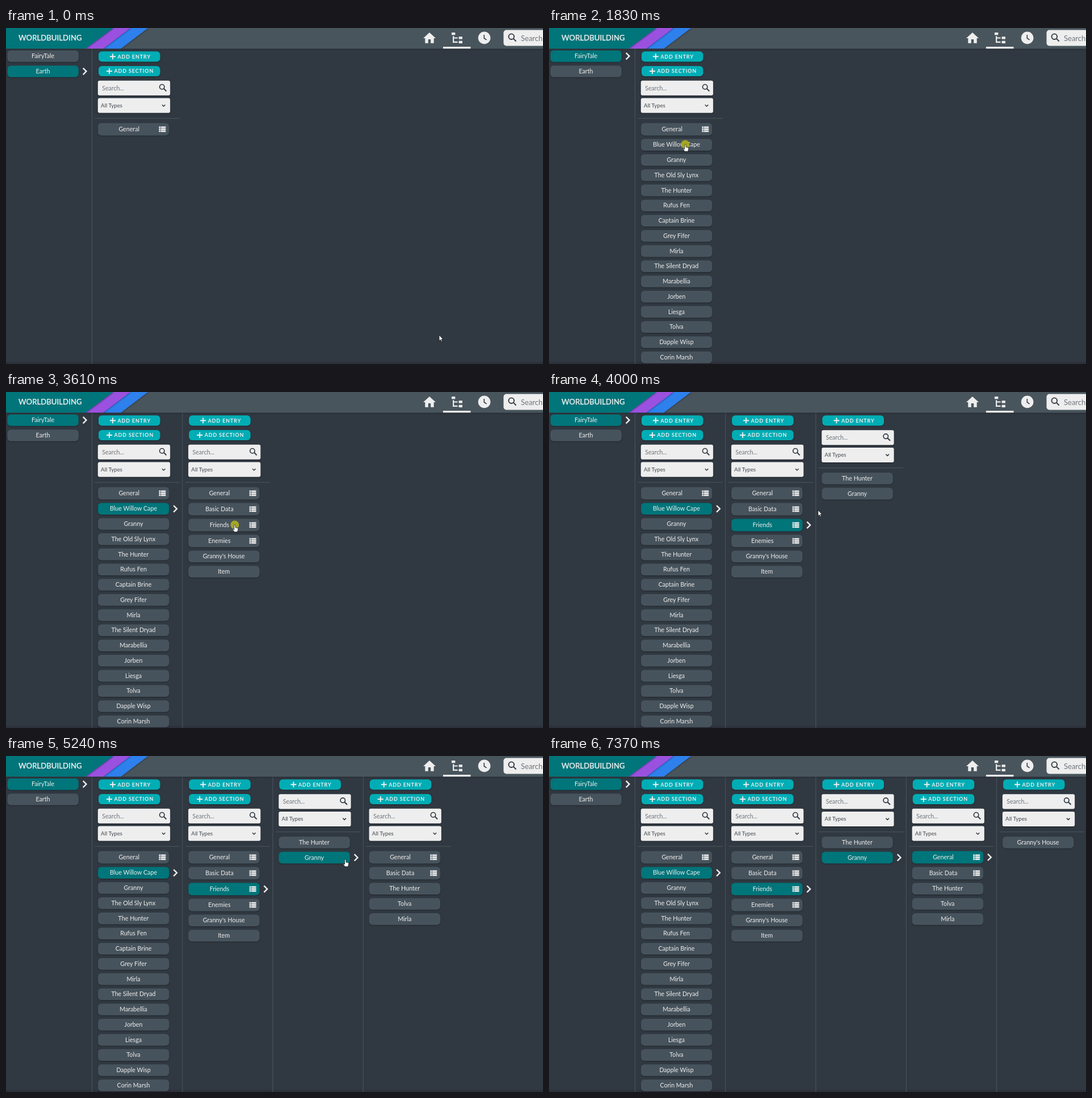
These frames come from a looping animation (946 px wide and 592 px high, 7.76 s). An HTML page:

```html
<!DOCTYPE html>
<html lang="en">
<head>
<meta charset="utf-8">
<title>Worldbuilding columns</title>
<style>
html, body { margin: 0; width: 100%; height: 100%; overflow: hidden; background: #303841; }
svg { display: block; width: 946px; height: 592px; font-family: Lato, "Open Sans", sans-serif; }
.row rect { fill: #46535c; }
.row.on rect { fill: #06747a; }
.row text { font-size: 10.7px; fill: #eee; text-anchor: middle; }
.add rect { fill: #00adb5; }
.add text { font-size: 9px; font-weight: 700; letter-spacing: .85px; fill: #eee; }
.chev, .plus { fill: none; stroke: #eee; }
.field { fill: #eee; }
.hint { font-size: 10.6px; fill: #70757a; }
.pick { font-size: 9.7px; fill: #42484e; }
.ink { fill: none; stroke: #303841; }
</style>
</head>
<body>
<svg id="stage" viewBox="0 0 946 592">
  <defs>
    <filter id="soft" x="-10%" y="-10%" width="120%" height="130%">
      <feDropShadow dx="0" dy="1" stdDeviation="1" flood-color="#000" flood-opacity=".35"/>
    </filter>
    <filter id="edge" x="-10%" y="-20%" width="130%" height="140%">
      <feDropShadow dx="1" dy="0" stdDeviation="1.6" flood-color="#000" flood-opacity=".5"/>
    </filter>
    <clipPath id="bar"><rect width="946" height="36.5"/></clipPath>
  </defs>
  <rect width="946" height="592" fill="#303841"/>
  <rect y="588.5" width="946" height="3.5" fill="#2c303a"/>
  <g id="columns"></g>
  <rect id="scroll" x="299.5" y="164.5" width="4.6" height="274" rx="2.3" fill="#495059"/>
  <g filter="url(#soft)"><rect width="946" height="36.5" fill="#48555d"/></g>
  <g clip-path="url(#bar)">
    <path d="M219 0H250L202 36.5H171z" fill="#2f80ed" filter="url(#edge)"/>
    <path d="M187 0H219L171 36.5H139z" fill="#9b51e0" filter="url(#edge)"/>
    <path d="M0 0H189L140 36.5H0z" fill="#06747a" filter="url(#edge)"/>
  </g>
  <text x="22" y="21.8" font-size="13.2" font-weight="500" fill="#eee" stroke="#eee" stroke-width=".25">WORLDBUILDING</text>
  <g fill="#eee">
    <path transform="translate(732.8 4.7) scale(1.1)" d="M10 20v-6h4v6h5v-8h3L12 3 2 12h3v8z"/>
    <path transform="translate(781.8 4.8) scale(1.055)" d="M3 3h6v4H3zM15 10h6v4h-6zM15 17h6v4h-6zM13 13H7v5h6v2H5V9h2v2h6z"/>
    <rect x="770" y="33" width="48.5" height="3.3"/>
    <circle cx="842.6" cy="17.4" r="10.8"/>
    <rect x="876.5" y="3.5" width="90" height="28" rx="5"/>
  </g>
  <path class="ink" d="M842.3 12V18L846.6 20.8" stroke-width="1.6"/>
  <path class="ink" d="M895.1 15.2A4.8 4.8 0 1 1 885.5 15.2A4.8 4.8 0 1 1 895.1 15.2M893.8 18.7L898.6 23.5" stroke-width="1.9"/>
  <text x="907" y="23" font-size="13" fill="#70757a">Search</text>
  <circle id="click" r="7.5" fill="#a6a523"/>
  <g id="cursor" fill="#fff" stroke="#15181c" stroke-width=".8" stroke-linejoin="round">
    <path id="arrow" d="M0 0V10.2L2.4 8.1L4 11.6L5.6 10.9L4.1 7.5H7z"/>
    <path id="hand" d="M-1.2 1.2C-1.2 -.4 1.2 -.4 1.2 1.2V4.8L4.9 5.6Q6.1 6 6 7.2L5.5 10L4.6 12.6H-.6L-3.6 8.8Q-4 7.4 -2.8 7.5L-1.2 8.6z"/>
  </g>
</svg>
<script>
const LOOP = 7760;
const $ = id => document.getElementById(id);
const NS = "http://www.w3.org/2000/svg";

function add(parent, tag, attrs, text) {
  const el = document.createElementNS(NS, tag);
  for (const k in attrs) el.setAttribute(k, attrs[k]);
  if (text) el.textContent = text;
  parent.appendChild(el);
  return el;
}
const show = (el, on) => el.setAttribute("display", on ? "inline" : "none");

// Moments at which a new item gets opened; each starts the next stage.
const opens = [980, 1980, 3765, 4858, 5970];
const LIST = "M4 5h4v4H4zM9 5h12v4H9zM4 10h4v4H4zM9 10h12v4H9zM4 15h4v4H4zM9 15h12v4H9z";
const rows = [], columns = [];

// "*" marks a section row; open = { label: [first stage, last stage] }
function addRows(g, x, y, labels, open, later) {
  labels.forEach((label, i) => {
    const section = label[0] === "*";
    const name = section ? label.slice(1) : label;
    const h = section ? 21.6 : 20.4, mid = y + h / 2;
    const row = add(g, "g", { class: "row" });
    add(row, "rect", { x, y, width: 125.3, height: h, rx: 6, filter: "url(#soft)" });
    add(row, "text", { x: x + (section ? 54.7 : 62.5), y: mid + 3.6 }, name);
    if (section) add(row, "path", { d: LIST, fill: "#eee", transform: `translate(${x + 104.7} ${mid - 8.4}) scale(.7)` });
    const chev = add(row, "path", { class: "chev", "stroke-width": 2.4, d: `M${x + 133.2} ${mid - 5.8}l5.8 5.8l-5.8 5.8` });
    rows.push({ row, chev, x, y, h, span: open[name], from: i ? later : 0, g });
    y += section ? 28 : 26.75;
  });
}

function addButton(g, x, y, label, inset) {
  const b = add(g, "g", { class: "add" });
  add(b, "rect", { x, y, width: 108.5, height: 18, rx: 6, filter: "url(#soft)" });
  add(b, "path", { class: "plus", "stroke-width": 1.9, d: `M${x + inset - 5} ${y + 9}h10m-5-5v10` });
  add(b, "text", { x: x + inset + 8.5, y: y + 12.3 }, label);
}

function addColumn(i, sections, labels, open, later = 0) {
  const g = add($("columns"), "g", {});
  const x = 151.5 + 159.25 * i, dy = sections ? 0 : -25.6;
  add(g, "rect", { x: x - .6, y: 36, width: 1.3, height: 556, fill: "#464f58" });
  addButton(g, x + 11.5, 41.3, "ADD ENTRY", 25);
  if (sections) addButton(g, x + 11.5, 67, "ADD SECTION", 19);
  const f = add(g, "g", { transform: `translate(${x} ${dy})` });
  for (const y of [92.8, 123.6])
    add(f, "rect", { class: "field", x: 10.4, y, width: 127.2, height: 26, rx: 3, filter: "url(#soft)" });
  add(f, "text", { class: "hint", x: 17.7, y: 109.6 }, "Search...");
  add(f, "circle", { class: "ink", cx: 123.3, cy: 103.7, r: 4.2, "stroke-width": 1.7 });
  add(f, "path", { class: "ink", "stroke-width": 2, d: "M126.4 106.8l4.6 4.6" });
  add(f, "text", { class: "pick", x: 15.6, y: 140 }, "All Types");
  add(f, "path", { class: "ink", "stroke-width": 1.5, d: "M123.4 135.2l2.8 2.8l2.8-2.8" });
  add(f, "rect", { x: 5, y: 158.7, width: 149.5, height: 1.1, fill: "#4a535c" });
  addRows(g, x + 10.5, 167.6 + dy, labels, open, later);
  columns.push(g);
}

const worlds = add($("columns"), "g", {});
addRows(worlds, 2.5, 39.4, ["FairyTale", "Earth"], { FairyTale: [1, 5], Earth: [0, 0] }, 0);
addColumn(0, true, ["*General", "Blue Willow Cape", "Granny", "The Old Sly Lynx", "The Hunter", "Rufus Fen",
  "Captain Brine", "Grey Fifer", "Mirla", "The Silent Dryad", "Marabellia", "Jorben", "Liesga", "Tolva",
  "Dapple Wisp", "Corin Marsh"], { "Blue Willow Cape": [2, 5] }, 1);
addColumn(1, true, ["*General", "*Basic Data", "*Friends", "*Enemies", "Granny's House", "Item"], { Friends: [3, 5] });
addColumn(2, false, ["The Hunter", "Granny"], { Granny: [4, 5] });
addColumn(3, true, ["*General", "*Basic Data", "The Hunter", "Tolva", "Mirla"], { General: [5, 5] });
addColumn(4, false, ["Granny's House"], {});

// Pointer path: time, x, y
const path = [[0, 763, 541], [600, 99, 51], [980, 99, 51], [1530, 240, 205], [1910, 240, 205], [2290, 375, 205],
  [2530, 408, 181], [2690, 404, 194], [2880, 404, 194], [3460, 403, 234], [3700, 403, 234], [4320, 549, 181],
  [4400, 548.5, 178.5], [4780, 548.5, 178.5], [5410, 620, 184], [5650, 668, 183], [5970, 668, 183],
  [6740, 860, 152], [6820, 860, 160], [7360, 850, 612], [LOOP, 850, 612]];

const bursts = [[70, 600, 8], [980, 1530, 8], [1830, 2530, 10], [2610, 2690, 2], [2920, 3460, 8], [3610, 4320, 10],
  [4400, 4400, 1], [4710, 5410, 10], [5490, 5650, 3], [5970, 6740, 11], [6820, 7370, 8]];

const clicks = [[1830, 1905], [3610, 3700], [4710, 4780], [5800, 5970]];

function snap(t) {
  let last = 0;
  for (const [a, b, n] of bursts) {
    if (t < a) break;
    const step = (b - a) / (n - 1) || 1;
    last = a + step * Math.min(n - 1, Math.floor((t + 8 - a) / step));
  }
  return last;
}

function pointer(t) {
  const i = Math.max(1, path.findIndex(p => p[0] >= t));
  const [t0, x0, y0] = path[i - 1], [t1, x1, y1] = path[i];
  const u = (t - t0) / (t1 - t0), e = u * u * (3 - 2 * u);
  return [x0 + (x1 - x0) * e, y0 + (y1 - y0) * e];
}

function draw(t) {
  const stage = opens.filter(o => t >= o).length;
  columns.forEach((g, i) => show(g, i === 0 || stage > i));
  const [x, y] = pointer(snap(t));
  let over = false;
  for (const r of rows) {
    const on = !!r.span && stage >= r.span[0] && stage <= r.span[1];
    const seen = stage >= r.from;
    r.row.setAttribute("class", on ? "row on" : "row");
    show(r.chev, on);
    show(r.row, seen);
    if (seen && r.g.getAttribute("display") !== "none" &&
        x > r.x && x < r.x + 125 && y > r.y && y < r.y + r.h) over = true;
  }
  const fade = t < 1980 ? 0 : Math.max(0, Math.min(1, (3150 - t) / 230));
  $("scroll").setAttribute("opacity", fade);
  $("cursor").setAttribute("transform", `translate(${x} ${y})`);
  show($("hand"), over);
  show($("arrow"), !over);
  $("click").setAttribute("cx", x);
  $("click").setAttribute("cy", y);
  show($("click"), clicks.some(([a, b]) => t >= a && t < b));
}

const start = performance.now();
function tick() {
  draw((performance.now() - start) % LOOP);
  requestAnimationFrame(tick);
}
draw(0);
requestAnimationFrame(tick);
</script>
</body>
</html>
```
